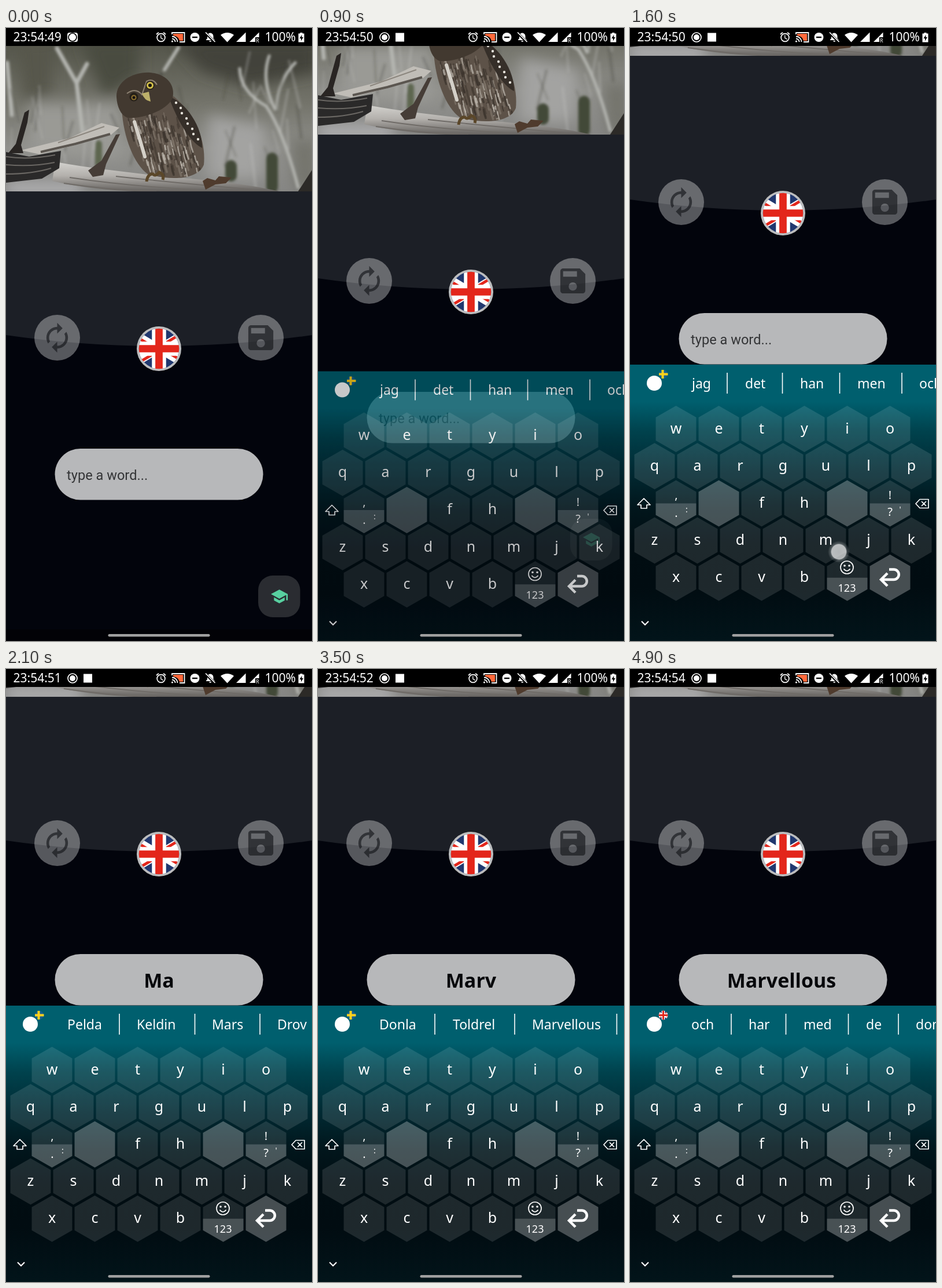
Write an HTML page that moves like this. It is 529 px wide and 1058 px high and loops after 5 s.

```html
<!DOCTYPE html>
<html lang="en">
<head>
<meta charset="utf-8">
<title>Word lookup</title>
<style>
html, body { margin: 0; height: 100%; overflow: hidden; background: #02040c; }
svg { display: block; width: 100vw; height: 100vh; }
text { font-family: "Noto Sans", "Open Sans", sans-serif; fill: #fff; }
.mid { text-anchor: middle; }
.hint { font: 23.6px Roboto, sans-serif; fill: #333436; }
.word { font-size: 34px; font-weight: 700; fill: #05060a; text-anchor: middle; }
.line { fill: none; stroke: #fff; }
</style>
</head>
<body>
<svg id="stage" viewBox="0 0 529 1058" preserveAspectRatio="none" xmlns="http://www.w3.org/2000/svg">
<defs>
  <linearGradient id="wood" x2="0" y2="1">
    <stop offset="0" stop-color="#55564b"/><stop offset=".4" stop-color="#74746b"/>
    <stop offset=".7" stop-color="#90908c"/><stop offset="1" stop-color="#868684"/>
  </linearGradient>
  <linearGradient id="bark" x2="0" y2="1">
    <stop offset="0" stop-color="#d3d2ce"/><stop offset=".45" stop-color="#b3b0ac"/><stop offset="1" stop-color="#5f5c59"/>
  </linearGradient>
  <linearGradient id="deep" x2="0" y2="1">
    <stop offset="0" stop-color="#005f6e"/><stop offset=".12" stop-color="#00424d"/>
    <stop offset=".28" stop-color="#012a33"/><stop offset=".43" stop-color="#01161c"/>
    <stop offset=".58" stop-color="#010d12"/><stop offset=".75" stop-color="#010c11"/>
    <stop offset="1" stop-color="#02151b"/>
  </linearGradient>
  <radialGradient id="glow">
    <stop offset="0" stop-color="#fff" stop-opacity=".66"/><stop offset=".66" stop-color="#fff" stop-opacity=".7"/>
    <stop offset=".74" stop-color="#fff" stop-opacity=".24"/><stop offset="1" stop-color="#fff" stop-opacity="0"/>
  </radialGradient>
  <filter id="soft" x="-20%" y="-20%" width="140%" height="140%"><feGaussianBlur stdDeviation="2.200"/></filter>
  <filter id="haze" x="-50%" y="-50%" width="200%" height="200%"><feGaussianBlur stdDeviation="12"/></filter>
  <clipPath id="frame"><rect y="31" width="529" height="251"/></clipPath>
  <clipPath id="chest"><path d="M200 142C203 190 222 236 245 252C285 264 332 262 342 236C346 195 328 150 290 122Z"/></clipPath>
  <clipPath id="disc"><circle r="35.5"/></clipPath>
  <g id="uk" clip-path="url(#disc)">
    <rect x="-36" y="-36" width="72" height="72" fill="#21386f"/>
    <path d="M-50-30L50 30M-50 30L50-30" stroke="#fff" stroke-width="14"/>
    <path d="M-50-27L0 3M50 27L0-3M-50 33L0 3M50-33L0-3" stroke="#e3261b" stroke-width="5"/>
    <path d="M-36 0H36M0-36V36" stroke="#fff" stroke-width="25"/>
    <path d="M-36 0H36M0-36V36" stroke="#e3261b" stroke-width="13"/>
  </g>
</defs>

<rect width="529" height="1058" fill="#02040c"/>
<rect y="1038" width="529" height="20" fill="#020206"/>
<g id="app">
  <path d="M0 282H529V530Q396 549 264.500 549Q132 549 0 530Z" fill="#1c1f26"/>
  <g clip-path="url(#frame)">
    <rect y="31" width="529" height="251" fill="url(#wood)"/>
    <g filter="url(#haze)">
      <path d="M290 20H540V75L420 100L340 75Z" fill="#42433a"/>
      <path d="M130 20H230V80L170 120Z" fill="#4a4b40"/>
      <path d="M20 20H80V110L30 130Z" fill="#56574b"/>
      <path d="M350 150L450 170L440 260H350Z" fill="#a3a3a1"/>
      <path d="M40 130H200V225L40 215Z" fill="#9a9a95"/>
      <path d="M490 190H540V280H500Z" fill="#74746d"/>
      <path d="M0 266H130V290H0Z" fill="#b4b4b6"/>
    </g>
    <g id="stems" filter="url(#soft)" fill="none" stroke="#b4b5b0" stroke-linecap="round">
      <path d="M88 35L122 95L132 178M140 62L122 95M2 60L10 150" stroke-width="7"/>
      <path d="M298 34L274 72" stroke-width="6"/>
      <path d="M404 70Q405 110 450 135Q480 180 505 275M455 48Q440 90 465 140M500 60Q470 90 468 140" stroke-width="5"/>
      <path d="M460 225V275M389 238V255" stroke="#434a39" stroke-width="20"/>
      <path d="M160 200V235" stroke="#5d6650" stroke-width="12"/>
    </g>
    <path d="M26 211L110 190L165 164L196 172L182 184L120 202L58 218Z" fill="#c0bdb7"/>
    <path d="M60 214L120 200L180 183" stroke="#5b5650" stroke-width="4" fill="none"/>
    <path d="M90 198L170 170" stroke="#8c877f" stroke-width="2" fill="none"/>
    <path d="M85 231C150 243 200 247 260 255C330 261 420 268 480 284H300C200 283 140 278 80 264Z" fill="url(#bark)"/>
    <path d="M110 258Q210 273 330 279M190 256Q300 268 430 279M100 268Q180 280 260 282" stroke="#6f6b67" stroke-width="1.800" fill="none"/>
    <path d="M0 214L40 222L95 212L92 242L62 260L0 267Z" fill="#2a2929"/>
    <path d="M0 222Q40 228 85 219M0 236Q45 240 84 232M0 252Q45 252 78 242" stroke="#6a6763" stroke-width="2" fill="none"/>
    <path d="M4 216L17 200L32 146L40 141L37 163L26 202L30 216Z" fill="#292523"/>
    <path d="M142 246L158 234L165 229L190 184L197 183L173 235L168 254L150 257Z" fill="#463d37"/>
    <path d="M340 264L348 259L362 263L368 256L390 258L380 268L362 270L345 279Z" fill="#4f3b2d"/>
    <path d="M505 282L529 245V282Z" fill="#2c2a27"/>
    <path d="M200 140C203 190 222 236 245 252C285 264 332 262 342 236C346 195 328 150 290 118Z" fill="#5d5248"/>
    <g id="plumes" clip-path="url(#chest)" fill="none" stroke-linecap="round"></g>
    <path d="M281 118C312 128 340 172 339 207C322 199 300 170 281 118Z" fill="#362f29"/>
    <path d="M191 119C190 92 220 75 250 77C278 80 293 98 288 121C278 143 235 157 210 155C198 150 192 136 191 119Z" fill="#423930"/>
    <path d="M209 113Q224 102 235 115L243 92Q254 86 261 98" stroke="#8e8373" stroke-width="2" fill="none"/>
    <circle cx="221" cy="119" r="7.500" fill="#241f18"/><circle cx="221" cy="120" r="4.500" fill="#8d702f"/><circle cx="221" cy="120" r="2.500" fill="#171310"/>
    <circle cx="249" cy="99" r="7.500" fill="#241f18"/><circle cx="249" cy="99" r="6" fill="#d3c04b"/><circle cx="249" cy="99" r="3" fill="#171310"/>
    <path d="M235 113L247 110L250 127Q239 125 235 113Z" fill="#bdb06a"/>
    <path d="M243 265Q245 251 254 252Q258 257 265 249Q274 253 271 262" stroke="#5b4729" stroke-width="5" fill="none"/>
  </g>
  <g fill="#fff" fill-opacity=".335"><circle cx="88.500" cy="534.500" r="39.500"/><circle cx="440.500" cy="534.500" r="39.500"/></g>
  <g fill="#14161b" fill-opacity=".65">
    <path transform="translate(60.500 506.500) scale(2.333)" d="M12 6v3l4-4-4-4v3c-4.420 0-8 3.580-8 8 0 1.570.46 3.030 1.240 4.260L6.700 14.800c-.45-.83-.7-1.790-.7-2.800 0-3.310 2.690-6 6-6zm6.760 1.740L17.300 9.200c.44.84.7 1.790.7 2.800 0 3.310-2.690 6-6 6v-3l-4 4 4 4v-3c4.420 0 8-3.580 8-8 0-1.570-.46-3.030-1.240-4.260z"/>
    <path transform="translate(411.700 505.700) scale(2.400)" d="M17 3H5c-1.110 0-2 .9-2 2v14c0 1.100.89 2 2 2h14c1.100 0 2-.9 2-2V7l-4-4zm-5 16a3 3 0 1 1 0-6 3 3 0 0 1 0 6zm3-10H5V5h10v4z"/>
  </g>
  <circle cx="264.500" cy="553.500" r="38.500" fill="#bcbdbe"/>
  <use href="#uk" transform="translate(264.500 553.500) scale(.98)"/>
  <rect x="84.500" y="726" width="360" height="88.500" rx="44.250" fill="#b7b8ba"/>
  <text id="hint" class="hint" x="105" y="780">type a word...</text>
  <text id="word" class="word" y="784"></text>
  <rect x="436" y="945" width="72.500" height="72" rx="25" fill="#2a2c31"/>
  <path transform="translate(456.700 965.200) scale(1.320)" fill="#58d0a0" d="M5 13.180v4L12 21l7-3.820v-4L12 17l-7-3.820zM12 3L1 9l11 6 9-4.910V17h2V9L12 3z"/>
</g>

<g id="board">
  <g id="sheet">
    <rect y="581" width="529" height="490" fill="#005f6e"/>
    <rect y="645" width="529" height="425" fill="url(#deep)"/>
    <g id="keys"></g>
    <g id="tips"></g>
    <circle cx="42" cy="613" r="13" fill="#fff"/>
    <g id="sv"><circle cx="57.500" cy="597.500" r="7.500" fill="#175f90"/><path d="M50 597.500H65.500M56.500 590V605" stroke="#ffd21c" stroke-width="4"/></g>
    <use id="en" href="#uk" transform="translate(57.500 597.500) scale(.225)"/>
    <g class="line" stroke-width="1.700" stroke-linejoin="round">
      <path d="M24 812L35 823H29V829H19V823H13Z"/>
      <path d="M501 813.500H516V828.500H501L494 821ZM504 817l8 8m0-8l-8 8"/>
      <circle cx="375" cy="931" r="11"/><path d="M369.500 933.500Q375 940.500 380.500 933.500"/>
    </g>
    <circle cx="371" cy="928" r="1.800" fill="#fff"/><circle cx="379" cy="928" r="1.800" fill="#fff"/>
    <path class="line" stroke-width="4.500" d="M448 934.500H456A8.700 8.700 0 0 1 456 952H435M445 941L434 952L445 963"/>
  </g>
  <path class="line" stroke-width="2.200" d="M20 1024l6 6 6-6"/>
</g>
<rect x="176.500" y="1046" width="176" height="4.500" rx="2.250" fill="#a0a0a0"/>

<rect width="529" height="31" fill="#000"/>
<g id="status" font-size="21">
  <text id="clock" x="12.500" y="23"></text>
  <g id="shot"><rect x="106" y="8" width="18" height="16" rx="3.500" fill="#fff"/><circle cx="115" cy="16" r="7" fill="#fff" stroke="#000" stroke-width="1.700"/></g>
  <g id="rec"><circle class="line" cx="115" cy="16" r="8" stroke-width="1.700"/><circle cx="115" cy="16" r="5" fill="#fff"/><rect x="134" y="8.500" width="15" height="15" fill="#fff"/></g>
  <path fill="#fff" transform="translate(257.700 5.400) scale(.86)" d="M22 5.720l-4.600-3.860-1.290 1.530 4.600 3.860zM7.880 3.390L6.600 1.860 2 5.710l1.290 1.530zM12.500 8H11v6l4.750 2.850.75-1.230-4-2.370zM12 4a9 9 0 1 0 0 18 9 9 0 0 0 0-18zm0 16a7 7 0 1 1 0-14 7 7 0 0 1 0 14z"/>
  <path d="M289 10H306V22H300Q298 14 289 13Z" fill="#ff6a3c"/>
  <path class="line" stroke-width="1.800" d="M287 11V8H308.500V24H300M287 14.500A9.500 9.500 0 0 1 296.500 24M287 18.500A5.500 5.500 0 0 1 292.500 24"/><circle cx="287.500" cy="23" r="1.600" fill="#fff"/>
  <circle cx="326.500" cy="16" r="8" fill="#fff"/><rect x="322" y="14.800" width="9" height="2.400" fill="#000"/>
  <path d="M346 21V20L348 18V14Q348 9 353 8.500Q358 9 358.500 14V18L360.500 20V21ZM351 22H355.500Q353 26 351 22Z" fill="#fff"/>
  <path d="M345 8.500L361 24.500" stroke="#000" stroke-width="4"/><path d="M345 7.500L361.500 24" stroke="#fff" stroke-width="1.700"/>
  <path d="M371 12Q382.500 4 394 12L382.500 24.500Z" fill="#fff"/>
  <path d="M398 24L414.500 7.500V24Z" fill="#fff"/>
  <path d="M421 24L437.500 7.500V16H431V24Z" fill="#fff"/><text x="432" y="25" font-size="9">R</text>
  <text x="447.500" y="23">100%</text>
  <path d="M508.500 8H512.500V9.500H515.500V24.500H505.500V9.500H508.500Z" fill="#fff"/><path d="M511.500 11.500L507.500 18H510V22.500L514 15.800H511.300Z" fill="#000"/>
</g>
<circle id="touch" r="19" fill="url(#glow)"/>
</svg>
<script>
const LOOP = 5000, STEP = 100;
const $ = id => document.getElementById(id);

function add(parent, tag, attrs, text) {
  const node = document.createElementNS('http://www.w3.org/2000/svg', tag);
  for (const k in attrs) node.setAttribute(k, attrs[k]);
  if (text) node.textContent = text;
  parent.append(node);
  return node;
}

let seed = 11;
const rnd = () => (seed = seed * 16807 % 2147483647) / 2147483647;

// Faint thicket behind the bird
for (let i = 0; i < 45; i++) {
  const x = rnd() * 529, y = 40 + rnd() * 170;
  add($('stems'), 'path', {
    d: `M${x} ${y}l${rnd() * 40 - 20} ${30 + rnd() * 50}`, 'stroke-width': 2 + rnd() * 3,
    stroke: i % 2 ? '#c4c4bf' : '#3f4037', opacity: .3
  });
}

// Plumage: fine pale and dark strokes, then wing spots
for (let i = 0; i < 190; i++) {
  const v = rnd(), x = 203 + v * 42 + rnd() * 95, y = 145 + v * 100, len = 6 + rnd() * 14;
  add($('plumes'), 'path', {
    d: `M${x} ${y}q${len * .05} ${len * .5} ${len * .25} ${len}`, 'stroke-width': 1.5 + rnd() * 2.5,
    stroke: ['#bdb6ac', '#3b332c', '#7d7267', '#463d35'][i % 4], opacity: .75
  });
}
add($('plumes'), 'path', { d: 'M222 162L230 188L240 222', stroke: '#d4d0c8', 'stroke-width': 6 });
for (let i = 0; i < 8; i++)
  add($('plumes').parentNode, 'circle', { cx: 294 + i * 5 + i % 2 * 3, cy: 129 + i * 9, r: 2.2, fill: '#e6e2da' });

// Keyboard
const ROWS = ['wetyio', 'qargulp', ',_fh_!', 'zsdnmjk', 'xcvb#>'];
const label = (x, y, s, size) => add($('keys'), 'text', { x, y, class: 'mid', 'font-size': size }, s);
const key = (d, alpha) => add($('keys'), 'path', { d, fill: '#fff', 'fill-opacity': alpha });

ROWS.forEach((row, r) => [...row].forEach((c, i) => {
  const x = (r % 2 ? 42.5 : 79.5) + i * 74, y = 692 + r * 64.2;
  key(`M${x} ${y - 40}l35 20v40l-35 20l-35-20v-40Z`, '_>'.includes(c) ? .27 : .115);
  if (',!#'.includes(c)) key(`M${x - 35} ${y}h70v20l-35 20l-35-20Z`, .19);
  else if (/[a-z]/.test(c)) label(x, y + 7.5, c, 25);
}));
label(80, 813, ',', 20);
label(80, 844, '.', 20);
label(98, 836, ':', 14);
label(449.5, 813, '!', 20);
label(449.5, 842, '?', 20);
label(467, 836, "'", 14);
label(375, 973, '123', 18);

// Suggestion rows: word, its x, divider after it
const TIPS = [
  [['jag', 107, 168], ['det', 199, 263.5], ['han', 294, 362.5], ['men', 393, 470], ['och', 500]],
  [['Pelda', 106, 196], ['Keldin', 226, 326.5], ['Mars', 356, 439], ['Drov', 469]],
  [['Donla', 106, 202], ['Toldrel', 233, 340], ['Marvellous', 370, 516.5]],
  [['och', 106, 175], ['har', 205, 269.5], ['med', 300, 377.5], ['de', 408, 464], ['dom', 494]]
].map(row => {
  const g = add($('tips'), 'g', { 'font-size': 23 });
  for (const [s, x, bar] of row) {
    add(g, 'text', { x, y: 621.5 }, s);
    if (bar) add(g, 'rect', { x: bar - .8, y: 595, width: 1.6, height: 36, fill: '#fff' });
  }
  return g;
});

// Timetables, [start step, value...]
const PAN = [[0, 0], [9, 98], [10, 185], [11, 226], [12, 234]];
const SHEET = [[0, 0, 0], [9, .78, 11.5], [10, 1, 0]];
const WORDS = [[0, ''], [17, 'M'], [21, 'Ma'], [24, 'Mar'], [28, 'Marv'], [43, 'Marvellous']];
const ROW = [[0, 0], [21, 1], [28, 2], [43, 3]];
const TAPS = [
  [0], [7, 262, 768, .6], [8, 262, 768, .4], [9],
  [15, 360, 903, 1], [16, 361, 904, 1], [17],
  [19, 118, 760, 1], [21], [22, 192, 761, 1], [24],
  [26, 236, 953, 1], [28], [40, 429, 616, 1], [43]
];

const at = (table, n) => table.filter(row => row[0] <= n).pop().slice(1);
const show = (node, on) => node.setAttribute('visibility', on ? 'inherit' : 'hidden');

function render(ms) {
  const n = Math.floor(ms % LOOP / STEP);
  $('clock').textContent = '23:54:' + (49 + Math.floor((n + 2) / 10));
  show($('shot'), n < 3);
  show($('rec'), n >= 3);

  $('app').setAttribute('transform', `translate(0 ${-at(PAN, n)[0]})`);
  const [alpha, drop] = at(SHEET, n);
  $('board').setAttribute('opacity', alpha);
  $('sheet').setAttribute('transform', `translate(0 ${drop})`);

  const [word] = at(WORDS, n), [row] = at(ROW, n);
  show($('hint'), !word);
  $('word').textContent = word;
  $('word').setAttribute('x', row === 3 ? 262 : 264.5);
  TIPS.forEach((g, i) => show(g, i === row));
  show($('sv'), row < 3);
  show($('en'), row === 3);

  const [x = 0, y = 0, o = 0] = at(TAPS, n);
  $('touch').setAttribute('transform', `translate(${x} ${y})`);
  $('touch').setAttribute('opacity', o);
}

const start = performance.now();
function tick(now) {
  render(Math.max(0, now - start));
  requestAnimationFrame(tick);
}
render(0);
requestAnimationFrame(tick);
</script>
</body>
</html>
```
